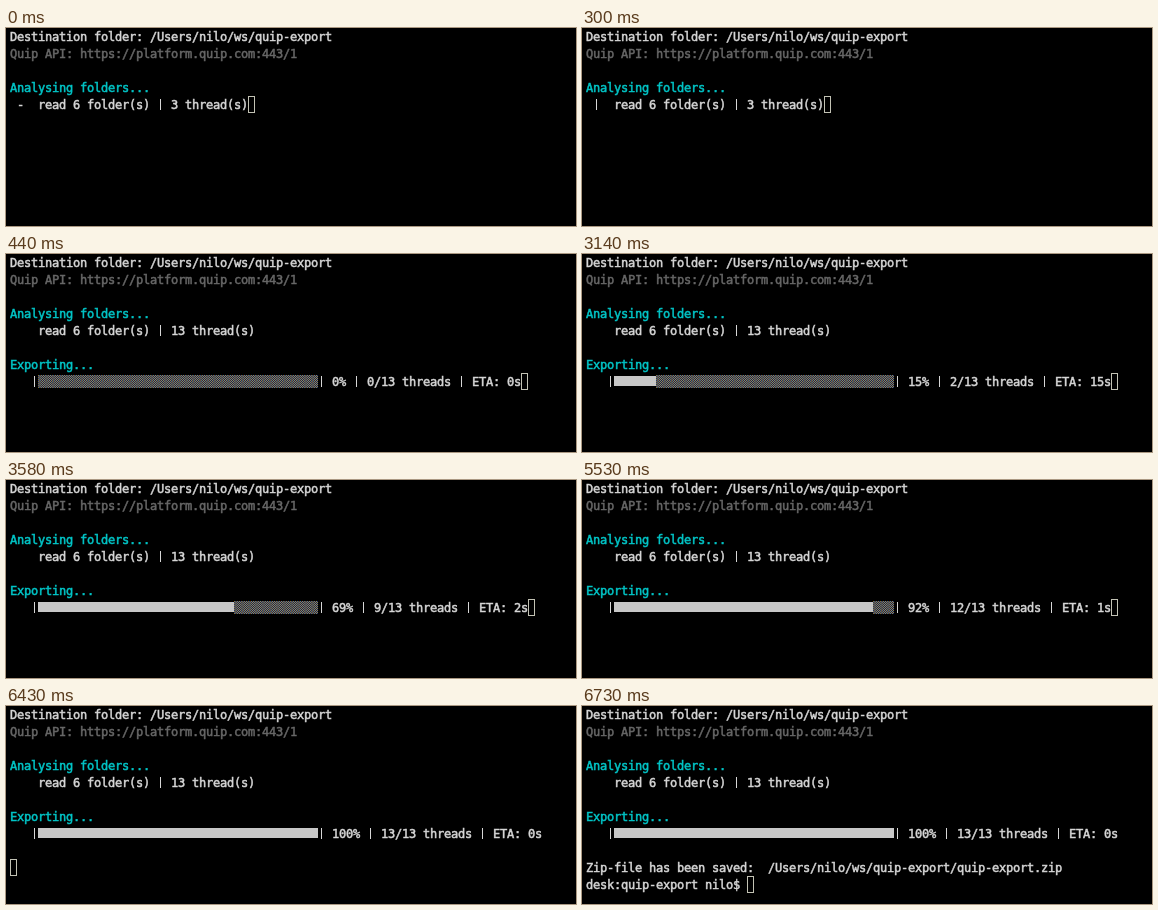
An HTML page with a canvas for the animation above (7.48 s loop, 570 by 198 pixels).

```html
<!DOCTYPE html>
<html lang="en">
<head>
<meta charset="utf-8">
<title>Export in a terminal</title>
<style>
  html, body { margin: 0; width: 100%; height: 100%; overflow: hidden; background: #000; }
  canvas { display: block; }
</style>
</head>
<body>
<canvas id="screen" width="570" height="198"></canvas>
<script>
const ctx = document.getElementById('screen').getContext('2d');
const LOOP = 7480, CELL = 7, ROW = 17, LEFT = 4;
const BAR_COL = 4, BAR_CELLS = 40, TOTAL = 13;
const WHITE = '#d6d6d6', CYAN = '#00c5c7', DIM = '#676767', BLOCK = '#c7c7c7', CURSOR = '#c2c2b4';
const HOME = '/Users/nilo/ws/quip-export';

// Progress reports: start time, threads done, estimated seconds left
const REPORTS = [
  [440, 0, 0], [3140, 2, 15], [3290, 5, 5], [3580, 9, 2], [5530, 12, 1], [6430, 13, 0]
];

const colX = col => LEFT + col * CELL;

// Writes on the character grid and returns the next free column
function write(row, col, text, color = WHITE) {
  ctx.fillStyle = ctx.strokeStyle = color;
  ctx.lineWidth = 0.5;
  for (const char of text) {
    const x = colX(col++), top = row * ROW;
    if (char === '|') {
      ctx.fillRect(x + 3, top + 3, 1, 11);
    } else if (char !== ' ') {
      ctx.fillText(char, x, top + 13);
      ctx.strokeText(char, x, top + 13);
    }
  }
  return col;
}

function cursor(row, col) {
  ctx.strokeStyle = CURSOR;
  ctx.lineWidth = 1;
  ctx.strokeRect(colX(col) + 0.5, row * ROW + 0.5, CELL - 1, ROW - 1);
}

// Four dots per cell, staggered by row, sampled at each subpixel
function shade(x, y) {
  const channel = c => 85 + 75 * Math.cos(2 * Math.PI * ((x + c / 3) * 4 / CELL + y / 2));
  return `rgb(${[0, 1, 2].map(channel).join()})`;
}

function progress(row, done, eta) {
  const filled = Math.round(done / TOTAL * BAR_CELLS);
  const start = colX(BAR_COL), split = start + filled * CELL, end = start + BAR_CELLS * CELL;
  const top = row * ROW;
  write(row, BAR_COL - 1, '|');
  for (let y = 2; y < 15; y++) {
    for (let x = split; x < end; x++) {
      ctx.fillStyle = shade(x - start, y);
      ctx.fillRect(x, top + y, 1, 1);
    }
  }
  ctx.fillStyle = BLOCK;
  ctx.fillRect(start, top + 3, split - start, 10);
  const percent = Math.floor(done / TOTAL * 100);
  return write(row, BAR_COL + BAR_CELLS,
    `| ${percent}% | ${done}/${TOTAL} threads | ETA: ${eta}s`);
}

function draw(time) {
  ctx.fillStyle = '#000';
  ctx.fillRect(0, 0, 570, 198);
  write(0, 0, 'Destination folder: ' + HOME);
  write(1, 0, 'Quip API: https://platform.quip.com:443/1', DIM);
  write(3, 0, 'Analysing folders...', CYAN);

  if (time < 440) {
    const spinner = time < 150 ? '-' : time < 300 ? '\\' : '|';
    cursor(4, write(4, 0, ` ${spinner}  read 6 folder(s) | 3 thread(s)`));
    return;
  }
  write(4, 4, 'read 6 folder(s) | 13 thread(s)');
  write(6, 0, 'Exporting...', CYAN);
  const [, done, eta] = REPORTS.filter(([start]) => start <= time).pop();
  const end = progress(7, done, eta);

  if (time >= 6730) {
    write(9, 0, `Zip-file has been saved:  ${HOME}/quip-export.zip`);
    cursor(10, write(10, 0, 'desk:quip-export nilo$ '));
  } else if (done === TOTAL) {
    cursor(9, 0);
  } else {
    cursor(7, end);
  }
}

ctx.font = '12px "DejaVu Sans Mono", monospace';
const begin = performance.now();
function tick() {
  draw((performance.now() - begin) % LOOP);
  requestAnimationFrame(tick);
}
tick();
</script>
</body>
</html>
```
